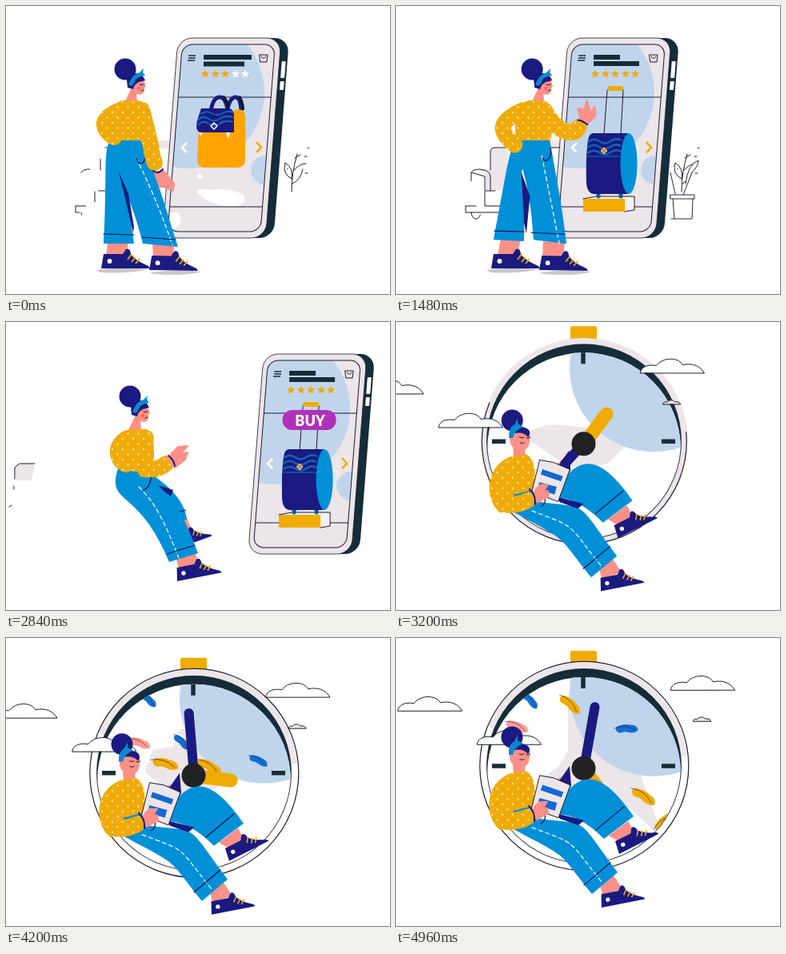
Recreate the animation shown at these times as an HTML page. Size 480 px wide and 360 px high, loop 5 s.

```html
<!DOCTYPE html>
<html lang="en">
<head>
<meta charset="utf-8">
<title>Mobile shopping</title>
<style>
html, body { margin: 0; width: 100%; height: 100%; overflow: hidden; background: #fff; }
svg { display: block; width: 100%; height: 100%; }
text { font: 900 18px Lato, "Open Sans", sans-serif; fill: #fff; text-anchor: middle; }
.line { fill: none; stroke: #1c1c30; stroke-width: 1; stroke-linecap: round; stroke-linejoin: round; }
</style>
</head>
<body>
<svg viewBox="0 0 480 360" xmlns="http://www.w3.org/2000/svg">
  <defs>
    <pattern id="dots" width="13" height="13" patternUnits="userSpaceOnUse">
      <rect width="13" height="13" fill="#f0ab00"/>
      <g fill="#f5dcc8"><circle cx="3" cy="3" r="1.2"/><circle cx="9.5" cy="9.5" r="1.2"/></g>
    </pattern>
    <clipPath id="screen"><rect x="6" y="8" width="116" height="234" rx="13" transform="matrix(1 0 -.078 1 215 40)"/></clipPath>
    <clipPath id="rim"><circle cx="235" cy="163" r="121"/></clipPath>
    <clipPath id="dial"><circle cx="235" cy="173" r="121"/></clipPath>
    <g id="shoe">
      <path d="M0 0L3 -18L27 -18L31 -24Q36 -26 37 -18Q42 -10 59 -3L61 0Z" fill="#1a1a80"/>
      <path d="M33 -11L38 -18M38 -8L43 -14M43 -6L48 -12" stroke="#f0ab00" stroke-width="1.8"/>
      <circle cx="10.500" cy="-9" r="2.900" fill="#fff"/>
    </g>
    <path id="leaf" d="M-15 -7Q-14 -13 -6 -10Q2 -8 7 -3Q16 2 13 10Q5 11 -1 5Q-4 1 -9 0Q-15 -1 -15 -7Z"/>
    <path id="cloud" d="M0 0C1 -8 10 -11 20 -9C28 -20 48 -20 53 -10C66 -13 76 -8 80 0Z"/>
  </defs>

  <g id="sofa">
    <path id="seat" d="M188 168H206V178H188Z" fill="#ece5e9"/>
    <path id="sofaFill" d="M119 178H140V230H112V206H96L119 204Z" fill="#ece5e9"/>
    <g id="sofaLines" class="line">
      <path d="M94 208Q98 202 110 205Q118 207 118 214V231"/>
      <path pathLength="100" d="M124 231H111V213L94 208V228"/>
      <path pathLength="100" d="M124 177H205M118 205V183Q118 177 124 177"/>
      <path pathLength="100" d="M87 250V258H135M87 250H100M111 232V250H130"/>
      <path pathLength="100" d="M94 258Q95 266 100 266Q105 266 106 258"/>
    </g>
    <g id="sofaBit">
      <path d="M118 182L122 177L143 177L139 198L119 198Z" fill="#ece5e9"/>
      <path class="line" d="M118 196V182L124 177H143M117 205V209M111 231L114 229"/>
    </g>
  </g>

  <g id="plant" class="line">
    <path d="M357 232Q357 208 364 185M357 216Q345 210 349 196Q360 203 357 216M352 204V203M358 222Q368 218 371 204M360 205Q369 196 375 197M361 190L368 186M373 188H376M374 209H377M377 177L379 178"/>
    <path id="pot" fill="#fff" d="M343 236H373V241H343ZM346 241L348 266H370L371 241M349 235L343 208M359 236L370 208Q378 200 378 193Q365 197 362 222M348 266H344"/>
  </g>

  <g id="phone">
    <g transform="matrix(1 0 -.078 1 215 40)">
      <rect x="8" width="131" height="250" rx="18" fill="#142d38"/>
      <rect width="129" height="250" rx="18" fill="#ece5e9" stroke="#1c1c30" stroke-width=".8"/>
      <rect x="132" y="29" width="5" height="21" rx="1" fill="#fff"/>
      <rect x="132" y="54" width="5" height="11" rx="1" fill="#fff"/>
    </g>
    <g clip-path="url(#screen)">
      <circle cx="228" cy="108" r="95" fill="#c0d5ec"/>
      <circle cx="324" cy="205" r="18" fill="#c0d5ec"/>
      <path id="gapA" fill="#fff" d="M238 232Q241 227 254 230Q282 226 298 237Q300 249 284 251Q252 249 238 232ZM239 212Q242 207 246 213Q244 219 239 215ZM205 260Q220 252 218 272L207 282Z"/>
      <path id="gapB" fill="#fff" d="M200 205Q225 196 250 206Q258 216 247 224Q290 230 310 245Q270 253 234 247Q222 253 204 248L212 230L200 226Z"/>
      <path class="line" d="M208 114H332M197 251H322"/>
      <g id="pack">
        <path d="M256 131Q259 114 267 114Q275 114 277 131M276 131Q280 114 287 114Q293 114 294 131" fill="none" stroke="#1a1a80" stroke-width="5"/>
        <path d="M271 113Q278 120 278 130M291 113Q296 120 296 130" fill="none" stroke="#101838" stroke-width="4"/>
        <path d="M241 152H282V136Q284 129 291 129Q299 130 299 140V192Q299 202 288 202H248Q239 202 239 190Z" fill="#ffa400"/>
        <path d="M244 128H279Q285 130 285 137V158H242Q236 155 239 143Z" fill="#1a1a80"/>
        <path d="M240 143Q246 136 253 141T267 141T284 139M240 149Q246 142 253 147T267 147T284 145M243 135Q250 130 257 134T271 134T284 133" fill="none" stroke="#1264b8" stroke-width="2"/>
        <path d="M260 146L264 150L260 154L256 150Z" class="line" style="stroke:#fff;stroke-width:1.5"/>
        <path d="M241 158H246L243 162ZM275 158H280L278 166Z" fill="#fff"/>
      </g>
      <g id="trunk">
        <path d="M234 241L250 238H298V255L286 257Z" class="line" style="fill:#f5f0f3"/>
        <rect x="234" y="241" width="52" height="16" fill="#f0ab00"/>
        <path d="M253 232V238M281 232V238" stroke="#0060b0" stroke-width="5" stroke-linecap="round"/>
        <path class="line" d="M260 160L264 105M281 160L284 105"/>
        <path d="M267 103H281" stroke="#f0ab00" stroke-width="6" stroke-linecap="round"/>
        <path d="M246 159H290V235H247Q239 234 238 222Q237 188 240 168Q241 160 246 159Z" fill="#1a1a80"/>
        <ellipse cx="291" cy="197" rx="10.5" ry="38" fill="#0090d8"/>
        <path d="M240 170Q247 164 254 169T268 169T282 168M239 177Q247 171 254 176T268 176T281 175M239 184Q247 178 254 183T268 183T281 182" fill="none" stroke="#1264b8" stroke-width="2.5"/>
        <path d="M239 188H281" stroke="#0090d8" stroke-width=".8"/>
        <path d="M260 177L264 181L260 185L256 181Z" fill="#f08a00" stroke="#cde" stroke-width="1"/>
      </g>
      <g id="buy"><rect x="-33.5" y="-12.5" width="67" height="25" rx="12" fill="#b130b8"/><text x="1" y="7">BUY</text></g>
      <path d="M226 171L220 177L226 183" fill="none" stroke="#fff" stroke-width="2.5"/>
      <path d="M313 170L319 177L313 183" fill="none" stroke="#f0ab00" stroke-width="2.5"/>
    </g>
    <rect class="line" x="6" y="8" width="116" height="234" rx="13" transform="matrix(1 0 -.078 1 215 40)"/>
    <path d="M228 62H237M228 65H237M227 68H236" stroke="#142d38" stroke-width="1.4"/>
    <path id="bars" fill="none" stroke="#142d38" stroke-width="6"/>
    <path class="line" d="M317 61H327L326 70H318ZM319 63Q322 68 325 63"/>
    <g id="stars"></g>
  </g>

  <g id="clock">
    <rect x="218" y="19" width="33" height="18" rx="2" fill="#f0ab00"/>
    <circle id="ring" cx="235.300" cy="163" fill="#ece5e9" stroke="#1c1c30" stroke-width="1.2"/>
    <path d="M119 115A125.500 125.500 0 0 1 360 151" fill="none" stroke="#ece5e9" stroke-width="7"/>
    <circle cx="235" cy="163" r="121.500" fill="#142d38" stroke="#1c1c30" stroke-width=".8"/>
    <g clip-path="url(#rim)">
      <circle cx="235" cy="173" r="121" fill="#fff"/>
      <g clip-path="url(#dial)">
        <path id="haze" fill="#ece5e9" stroke="#ece5e9" stroke-width="8" stroke-linejoin="round"/>
        <circle cx="322" cy="71" r="105" fill="#c0d5ec"/>
        <g id="leaves"></g>
      </g>
    </g>
    <path d="M234 52V66M120 163H137M332 163H349" stroke="#142d38" stroke-width="5.5"/>
    <path id="minute" d="M235 166V88" stroke="#1a1a80" stroke-width="12" stroke-linecap="round"/>
    <path id="hour" d="M235 166V119" stroke="#f0ab00" stroke-width="17" stroke-linecap="round"/>
    <circle cx="234.500" cy="166" r="15" fill="#202224"/>
  </g>
  <g id="clouds" class="line"></g>
  <g id="woman"></g>
</svg>
<script>
const LOOP = 5000, NS = 'http://www.w3.org/2000/svg';
const $ = id => document.getElementById(id);
const set = (el, o) => { for (const k in o) el.setAttribute(k, o[k]); return el; };
const add = (parent, tag, o) => parent.appendChild(set(document.createElementNS(NS, tag), o));
const clamp = x => Math.max(0, Math.min(1, x));
const span = (t, a, b) => clamp((t - a) / (b - a));
const smooth = k => k * k * (3 - 2 * k);
const out = k => 1 - (1 - k) ** 3;
const show = (el, on) => el.setAttribute('visibility', on ? 'visible' : 'hidden');

// Blend every number of two equally built strings
const NUM = /-?\d+(\.\d+)?/g;
function mix(a, b, k) {
  const n = b.match(NUM);
  let i = 0;
  return a.replace(NUM, x => (+x + (n[i++] - x) * k).toFixed(2));
}
function keyed(t, keys, ease = smooth) {
  let i = 1;
  while (i < keys.length - 1 && t > keys[i][0]) i++;
  const [t0, a] = keys[i - 1], [t1, b] = keys[i];
  return a + (b - a) * ease(span(t, t0, t1));
}

const NAVY = '#1a1a80', BLUE = '#0090d8', SKIN = '#ff9088', DOTS = 'url(#dots)';
const woman = $('woman'), parts = [];
// Poses: stand, touch, press, lean back, sit
function part(tag, attr, style, poses) {
  if (poses.length === 4) poses.splice(2, 0, poses[1]);
  const el = add(woman, tag, style);
  parts.push({ el, attr, poses });
  return el;
}
const fill = (c, ...p) => part('path', 'd', { fill: c }, p);
const line = (c, w, ...p) => part('path', 'd', { fill: 'none', stroke: c, 'stroke-width': w, 'stroke-linecap': 'round' }, p);
const group = (html, ...p) => { const g = part('g', 'transform', {}, p); g.innerHTML = html; return g; };
const shoe = (...p) => group('<use href="#shoe"/>', ...p.map(([x, y, r, s]) => `translate(${x} ${y}) rotate(${r}) scale(${s})`));

const shade = add(woman, 'path', { d: 'M113 330Q135 326 180 329Q150 335 118 333ZM180 333Q215 329 245 332Q225 338 184 335Z', fill: '#c9c7cc' });
fill(SKIN, 'M127 295L153 295L150 313L125 313Z', 'M131 291L156 291L151 313L127 313Z', 'M208 240L224 240L234 264L222 266Z', 'M266 250L290 232L298 247L278 257Z');
shoe([119, 328, 0, 1], [119, 328, 0, 1], [212, 284, -20, .8], [279, 273, -27, .91]);
fill(BLUE, 'M130 167C121 185 127 210 122 297L160 297C156 260 150 235 141 205L168 167Z',
  'M151 167C142 180 140 200 122 292L160 294C162 260 157 240 158 205L192 167Z',
  'M150 186C160 220 190 230 205 252L226 247C224 225 205 205 181 190L160 186Z',
  'M198 222C210 225 228 222 260 254L297 226C255 165 225 165 198 222L198 222Z');
line('#101050', 1.2, 'M122 285L160 286', 'M123 281L160 282', 'M214 238L225 235', 'M250 243L285 214');
fill(SKIN, 'M183 298L210 298L209 313L184 313Z', 'M184 294L211 294L209 313L183 313Z', 'M212 295L237 288L240 304L216 307Z', 'M255 313L272 300L283 317L258 324Z');
shoe([179, 330, 1, 1], [179, 330, 1, 1], [214, 324, -11, .93], [257, 340, -11, .91]);
fill(BLUE, 'M130 167C130 200 155 230 171 297L215 301C200 255 190 215 168 167Z',
  'M151 167C155 200 168 215 172 292L213 297C208 250 202 220 193 167Z',
  'M140 183C125 230 165 205 204 300L240 289C225 250 215 225 181 186Z',
  'M147 242C222 282 200 268 245 323L277 296C222 222 245 238 172 228Z');
fill(NAVY, 'M141 207L153 235L160 276L159 283Z', 'M157 207L168 238L163 285L160 270Z', 'M190 204L209 210L206 218L197 211Z', 'M200 222L235 231L228 237L205 229Z');
const seam = line('#fff', 1.2, 'M163 190C180 225 195 260 208 299', 'M183 187C190 225 197 260 204 297', 'M166 206C190 230 200 255 216 295', 'M170 240C228 262 212 252 257 308');
set(seam, { 'stroke-dasharray': '5 4' });
line('#101050', 1.2, 'M170 289L212 292', 'M169 283L211 285', 'M201 290L236 279', 'M235 312L268 284');
line('#101050', 1.2, 'M163 190C166 200 172 198 174 190', 'M184 190C187 197 196 192 194 178', 'M181 190C182 200 178 207 172 210', 'M181 235C187 232 187 226 186 222');
line(DOTS, 20, 'M143 130Q118 140 124 153Q128 160 135 164', 'M160 130Q133 142 134 154Q136 164 149 174', 'M150 146Q138 155 140 165Q142 175 150 178', 'M140 190Q132 205 134 215Q138 224 146 230');

const profile = group(`<path d="M158 92L172 90Q173 97 175 100L173 102Q174 110 167 111L163 110L164 120L148 121L156 104Z" fill="${SKIN}"/>
  <path d="M151 92Q151 84 161 84Q170 83 174 93L166 95Q160 98 159 104L152 102Z" fill="${NAVY}"/>
  <path d="M153 98Q158 85 167 83L172 78L171 83L174 87Q166 88 162 92Q160 98 157 100Z" fill="#0c88cc"/>
  <path d="M167 98Q169 100 172 98M169 106L172 105" class="line"/>
  <circle cx="166" cy="103" r="2.200" fill="#f9686c"/>`,
  'translate(0 0)', 'translate(22 0)', 'translate(5 14)', 'translate(-9 50)');
const facing = add(woman, 'g', {});
facing.innerHTML = `<path d="M143 145Q140 155 146 161L147 176L162 175L161 164Q168 160 167 144L158 137L146 138Z" fill="${SKIN}"/>
  <path d="M147 138Q155 132 165 138Q169 143 165 148Q159 141 148 143Z" fill="${NAVY}"/>
  <path d="M141 149Q140 136 148 132L152 124L152 131L159 135Q148 139 146 149Z" fill="#0c88cc"/>
  <path d="M154 148Q157 150 160 148M163 149Q166 150 168 148M155 155Q157 156 160 155" class="line"/>`;
const bun = part('circle', 'transform', { r: 13.5, fill: NAVY }, ['translate(149 79)', 'translate(171 79)', 'translate(155 93)', 'translate(145 127)']);
woman.insertBefore(bun, profile);

fill(DOTS, 'M147 118C130 120 128 140 130 168L170 168C184 160 186 122 165 118Z', 'M168 118C150 121 148 145 151 168L194 168C197 150 200 125 186 118Z',
  'M155 134C135 138 130 165 140 184L182 190C186 170 188 145 176 134Z', 'M147 171C112 180 108 225 130 243L172 234C168 215 182 185 164 170Z');

const book = add(woman, 'g', {});
book.innerHTML = `<path d="M200 181Q205 175 212 180L206 186Z" fill="${SKIN}"/><path d="M203 183L217 163L219 188L214 196Z" fill="${NAVY}"/>
  <path d="M180 175L197 178L218 187L203 228L187 222L169 219Z" class="line" style="fill:#ece5e9"/>
  <path d="M182 190L208 199" stroke="#1268d0" stroke-width="7"/>
  <path d="M178 208L200 214" stroke="#1268d0" stroke-width="10"/>
  <path d="M147 220L168 215" stroke="${BLUE}" stroke-width="2.500"/>`;

line(DOTS, 20, 'M170 130Q178 160 181 175Q183 190 186 196', 'M186 130Q198 152 216 157Q226 158 230 150', 'M186 130Q202 155 222 156Q232 155 242 149',
  'M175 145Q168 176 174 184Q190 186 200 177', 'M136 188Q128 224 140 233Q155 233 164 227');
fill(SKIN, 'M186 209L197 206L210 222L209 231L203 222L204 229L198 226L192 226Z', 'M232 140L241 145L251 134L250 121L245 130L240 114L237 126L229 124Z',
  'M247 139L256 146L268 138L270 125L262 123L257 116L253 124L248 128Z', 'M203 172L211 182L224 172L227 163L218 165L227 155L215 156L207 164Z',
  'M172 217L176 230L190 222L189 216L184 215L189 208L180 208L174 213Z');
set(woman.lastChild, { stroke: SKIN, 'stroke-width': 2, 'stroke-linejoin': 'round' });
line(NAVY, 2, 'M184 206Q190 211 196 204', 'M229 140Q234 140 241 146', 'M245 138Q252 139 256 147', 'M203 167Q210 172 211 180', 'M166 213Q174 220 173 232');

// Rating
const stars = [249, 262, 274, 287, 299].map(x => {
  let d = '';
  for (let i = 0; i < 10; i++) {
    const a = i * Math.PI / 5, r = i % 2 ? 2.4 : 5.6;
    d += (i ? 'L' : 'M') + (x + r * Math.sin(a)).toFixed(1) + ' ' + (85 - r * Math.cos(a)).toFixed(1);
  }
  return add($('stars'), 'path', { d: d + 'Z' });
});

// Leaves: colour, size, turn, then [time, x, y] stops
const PINK = '#ff9c94', GOLD = '#f0ab00', SKY = '#1470d4';
const leaves = [
  [PINK, .88, -14, [3300, 215, 168], [3600, 180, 157], [4200, 167, 126], [5100, 149, 112]],
  [SKY, .6, 20, [3200, 215, 150], [3600, 151, 84], [3750, 130, 65]],
  [SKY, .75, 8, [3300, 225, 155], [3600, 208, 115], [4200, 178, 72], [4450, 165, 50]],
  [GOLD, 1, 0, [3200, 220, 150], [3600, 199, 97], [4100, 175, 60]],
  [GOLD, 1, -18, [3950, 230, 165], [4200, 200, 152], [4650, 160, 125]],
  [SKY, .75, 12, [4050, 234, 162], [4200, 220, 125], [4960, 168, 82], [5200, 150, 70]],
  [GOLD, 1, -3, [4050, 235, 165], [4200, 255, 156], [4960, 310, 202], [5200, 330, 215]],
  [SKY, .75, -5, [3900, 240, 165], [4200, 316, 148], [4400, 365, 140]],
  [SKY, .85, -35, [4400, 240, 160], [4960, 289, 117], [5200, 315, 95]],
  [GOLD, .95, 6, [4400, 232, 155], [4960, 218, 87], [5200, 210, 60]],
  [GOLD, .9, -75, [4400, 245, 175], [4960, 336, 232], [5200, 360, 250]]
].map(([color, size, turn, ...stops]) => {
  const el = add($('leaves'), 'g', {});
  el.innerHTML = `<use href="#leaf" fill="${color}"/><path class="line" d="M-16 -11Q1 -9 9 7" style="stroke-width:.6"/>`;
  return { el, size, turn, stops };
});

const clouds = [[-31, 94, 1, -1], [68, 136, 1, -1], [310, 68, 1, 1], [338, 107, .28, 1]].map(([x, y, s, side]) =>
  ({ x, y, s, side, el: add($('clouds'), 'use', { href: '#cloud', fill: s < .5 ? '#ece5e9' : '#fff', style: `stroke-width:${1 / s}` }) }));

const HAZE = ['M165 155L190 146L215 147L235 150L270 163L285 165L262 188L215 190Z',
  'M178 160L186 138L212 134L220 112L240 115L268 160L262 178L215 190Z',
  'M180 184L205 168L219 145L219 75L245 145L302 176L326 242L262 182Z'];

function drawShop(t) {
  const go = 76 * (Math.max(0, t - 2470) / 330) ** 3, next = t > 1180;
  const on = t < 3250;
  for (const id of ['phone', 'sofa']) show($(id), on);
  show($('plant'), t < 2700);
  set($('phone'), { transform: `translate(${go} 0)` });
  set($('sofa'), { transform: `translate(${-go} 0)` });
  const reveal = 12 + 88 * span(t, 250, 1700);
  set($('sofaLines'), { 'stroke-dasharray': `${reveal} 100`, opacity: 1 - span(t, 2550, 2750) });
  set($('sofaFill'), { opacity: t > 500 && t < 1500 ? 1 : 0 });
  set($('sofaBit'), { opacity: t > 2650 ? 1 : 0 });
  set($('seat'), { opacity: t < 2500 ? 1 : 0 });
  set($('pot'), { opacity: span(t, 1100, 1500) });
  set($('gapA'), { opacity: t < 420 ? 1 : 0 });
  set($('gapB'), { opacity: t >= 420 && t < 1250 ? 1 : 0 });
  const swipe = keyed(t, [[820, 0], [880, 4], [1240, 135]]);
  set($('pack'), { transform: `translate(${-swipe} 0)` });
  set($('trunk'), { transform: `translate(${135 - swipe} 0)` });
  const press = 1 - .07 * Math.sin(Math.PI * span(t, 2130, 2330));
  set($('buy'), { transform: `translate(272 122.500) scale(${out(span(t, 1520, 1720)) * press})` });
  set($('bars'), { d: next ? 'M247 64H280M247 72H304' : 'M247 64H307M247 72.500H298' });
  const gold = t < 1250 ? 3 : t < 1380 ? 4 : 5;
  stars.forEach((s, i) => s.setAttribute('fill', i < gold ? '#f5a800' : '#fff'));
}

function drawClock(t, bob) {
  const enter = out(span(t, 2880, 3340)), on = t > 2880;
  show($('clock'), on);
  show($('clouds'), on);
  set($('clock'), { transform: `translate(0 ${bob - 330 * (1 - enter)})` });
  set($('ring'), { fill: t < 3900 ? '#ece5e9' : '#fff', r: 128 + 2.5 * span(t, 3600, 4000) });
  set($('haze'), { d: t < 4200 ? mix(HAZE[0], HAZE[1], span(t, 3600, 4200)) : mix(HAZE[1], HAZE[2], span(t, 4200, 4960)) });
  const s = t - 3600;
  set($('minute'), { transform: `rotate(${59.5 + s * .493} 234.500 166)` });
  set($('hour'), { transform: `rotate(${61 + s * .06} 234.500 166)` });
  for (const { el, size, turn, stops } of leaves) {
    const a = stops[0][0], b = stops[stops.length - 1][0];
    const x = keyed(t, stops.map(p => [p[0], p[1]]), k => k), y = keyed(t, stops.map(p => [p[0], p[2]]), k => k);
    const z = size * span(t, a, a + 120) * (1 - span(t, b - 90, b));
    set(el, { transform: `translate(${x} ${y}) rotate(${turn + 4 * Math.sin(s / 190)}) scale(${z})` });
  }
  for (const c of clouds) set(c.el, {
    transform: `translate(${c.x + s * .0245 + c.side * 180 * (1 - enter)} ${c.y + bob}) scale(${c.s})`
  });
}

function drawWoman(t, bob) {
  const p = t < 2300 ? keyed(t, [[0, 0], [120, 0], [760, 1], [900, 1], [1120, .84], [1400, .95], [1650, 1], [2080, 2], [2300, 2]])
    : t < 2840 ? 2 + span(t, 2300, 2840) ** 1.7 : 3 + out(span(t, 2840, 3340));
  const i = Math.min(3, Math.floor(p));
  for (const { el, attr, poses } of parts) el.setAttribute(attr, mix(poses[i], poses[i + 1], p - i));
  show(profile, p < 3.6);
  show(facing, p >= 3.6);
  set(facing, { transform: `translate(${10 * (4 - p)} ${-34 * (4 - p)})` });
  set(shade, { opacity: 1 - span(t, 2350, 2550) });
  const k = out(span(t, 2980, 3280));
  set(book, { opacity: k > 0 ? 1 : 0, transform: `translate(180 215) scale(${k}) translate(-180 -215)` });
  set(woman, { transform: `translate(0 ${bob * smooth(span(t, 2900, 3350))})` });
}

function draw(t) {
  const bob = .7 + 6.5 * Math.cos((t - 4050) / 1400 * 2 * Math.PI);
  drawShop(t);
  drawClock(t, bob);
  drawWoman(t, bob);
}

const start = performance.now();
function tick() {
  const t = (performance.now() - start) % LOOP;
  draw(Math.floor(t / 40) * 40);
  requestAnimationFrame(tick);
}
tick();
</script>
</body>
</html>
```
